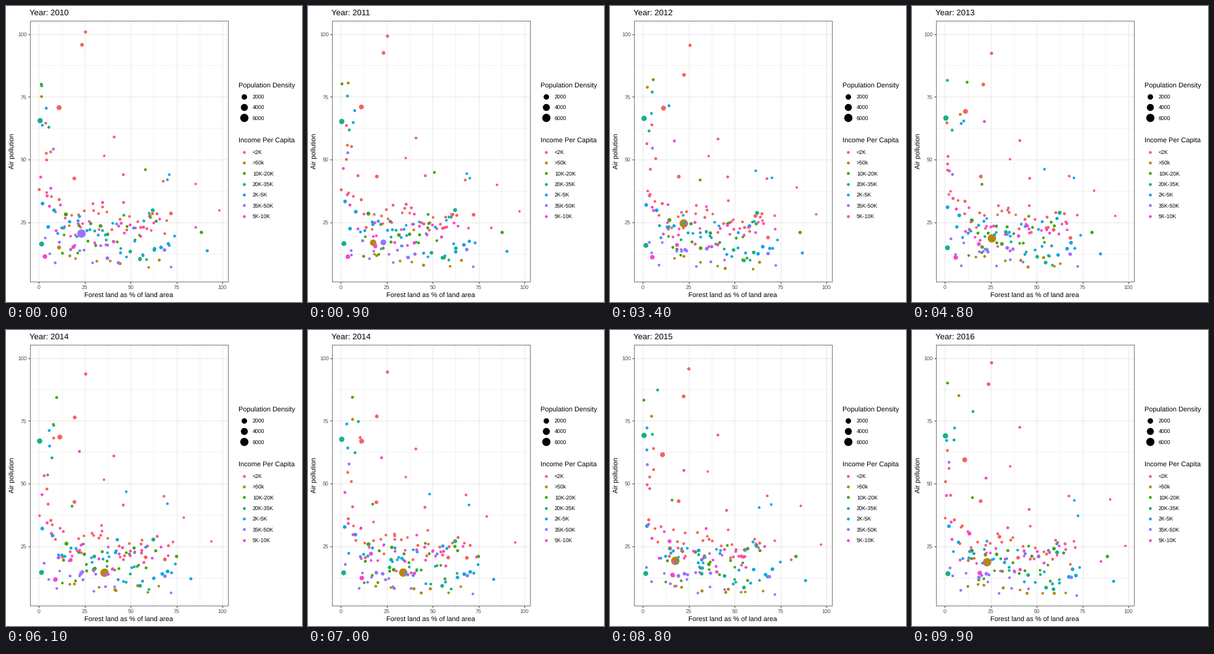
Animation of 480x480 px, one loop 10 s. Source, as a matplotlib script:

```python
import numpy as np
import matplotlib.pyplot as plt
from matplotlib.animation import FuncAnimation
from matplotlib.ticker import FixedLocator

SIZE, FRAMES, YEARS = 480, 100, 7
plt.rcParams.update({"font.family": "Liberation Sans", "text.hinting": "none"})

rng = np.random.default_rng(12)
later = np.arange(YEARS) > 0
layers = []


def spread(keys):
    """Stretch one or more evenly spaced key values over all years."""
    keys = np.atleast_1d(keys)
    return np.interp(np.linspace(0, 1, YEARS), np.linspace(0, 1, len(keys)), keys)


def anchor(x, y, d):
    """A dot that keeps near its place, or follows its keys exactly."""
    keyed = np.ndim(x) > 0
    shake = 0 if keyed else later * rng.normal(0, 1, YEARS)
    return [spread(x) + 0.3 * shake, spread(y) + 0.8 * shake, spread(d)]


def tail(n, low, high):
    """Polluted places with little forest, which jump from year to year."""
    x = np.minimum(rng.exponential(4, (n, YEARS)), 22)
    y = rng.uniform(low, high, (n, 1)) + later * rng.normal(0, 5, (n, YEARS))
    return np.stack([x, y, np.full(x.shape, 4.7)], axis=1)


def cloud(n, left, right, mid, sd, lift):
    """Small dots around random homes; each year some of them trade places."""
    x = left + (right - left) * (np.arange(n) + rng.random(n)) / n
    y = mid + lift * np.exp(-x / 10) + sd * np.clip(rng.normal(size=n), -1.7, 2.2)
    d = 4.2 + np.minimum(rng.exponential(0.5, n), 1.8)
    years = []
    for k in range(YEARS):
        if k:
            pick = np.flatnonzero(rng.random(n) < 0.25)
            x[pick], y[pick] = np.roll(x[pick], 1), np.roll(y[pick], 1)
        px, py = rng.normal(0, 1, (2, n)) * later[k]
        years.append((np.maximum(x + px, 0.2), np.maximum(y + py - 0.3 * k, 6.3), d))
    return np.array(years).transpose(2, 1, 0)


def series(label, color, anchors, tails, rule):
    lead = [anchor(*a) for a in anchors]
    layers.append((label, color, np.concatenate([lead, tail(*tails), cloud(*rule)])))


# Anchors: x, y, diameter. Tails: count, y range.
# Clouds: count, x range, mean y, its deviation, extra height at the left.
series("<2K", "#F8625C", [
    (11, (70.7, 70, 67, 60), 8),
    (25.4, (100.8, 92, 98), 5.3),
    ((23.5, 22.5, 19, 23.8), (95.7, 84, 75, 89.6), 6),
    (19.3, 42.5, 6),
    (41, (59, 58, 73), 4.6),
    (35.6, (51.5, 50.5, 57), 4),
    (67.7, (41.4, 45.5), 4.4),
    (46, (44, 40), 4.7),
], (4, 48, 72), (30, 0, 74, 27, 4.5, 13))

gold_x, gold_y = (11, 23, 22, 26, 40, 15, 23), (15, 18.5, 25, 18, 13, 19.5, 18.7)
series(">50k", "#B5880C", [(gold_x, gold_y, [6.4] + [13.6] * 6)],
       (1, 75, 85), (8, 10, 72, 10.5, 2, 0))

series("10K-20K", "#3FA60A", [
    ((88.5, 86, 73, 88.5), 21, 5.4),
    (14.7, (28.2, 23.5), 6.4),
    ((58, 19, 15), (46, 40, 44.4), 4.5),
], (1, 45, 82), (19, 10, 65, 19, 4.5, 0))

series("20K-35K", "#14B284", [
    (0.7, (65.5, 67, 70), 8.6),
    (1.5, (16.4, 13.7), 8),
    (62, (29.8, 25), 6.4),
    (55, (10.3, 8.3), 6),
], (2, 58, 85), (7, 18, 66, 17, 4, 0))

series("2K-5K", "#10A6E8", [
    ((91.7, 87, 82, 91.9), (13.7, 11.1), 5),
    (2, 32.5, 6),
    ((71, 62, 45, 72.5), (44, 45.5, 47, 37.2), 4.3),
    (70, 42, 4.3),
], (2, 52, 76), (27, 3, 76, 20.5, 5.5, 13))

fade = [13.6] + [6] * 6
series("35K-50K", "#9574FF", [
    ((23.2, 22.6), 9 + 0.85 * np.array(fade), fade),
    (68.4, (14, 11.5), 5.8),
    (72, (7.2, 6), 4.2),
], (1, 40, 62), (13, 1, 44, 14, 3, 0))

series("5K-10K", "#FB45CF", [
    ((3.3, 6, 19), (11.4, 11, 14.4), 7.4),
    ((18.8, 18.5, 13.4), (15.2, 16.4, 30.1), 6.4),
    ((85.4, 84, 78, 90), (40.3, 39, 36, 43.7), 4),
    ((98.3, 92.6, 98.3), (29.8, 25.2), 3.9),
    ((6.5, 22, 22.4), (38.6, 66, 52.2), 4.8),
    ((85.4, 66, 85), (23, 22, 19), 4.3),
], (1, 40, 64), (25, 2, 67, 23.5, 4.5, 8))

points = np.concatenate([pts for *_, pts in layers]).transpose(2, 1, 0)
colors = [c for _, c, pts in layers for _ in pts]

# dpi 72 makes one point equal one pixel
fig = plt.figure(figsize=(SIZE / 72, SIZE / 72), dpi=72, facecolor="white")
L, R, T, B = 38.5, 360.3, 23.5, 447.3
X0, DX, Y0, DY = 53.3, 2.978, 452.7, 4.072
ax = fig.add_axes([L / SIZE, 1 - B / SIZE, (R - L) / SIZE, (B - T) / SIZE])
ax.set(xlim=((L - X0) / DX, (R - X0) / DX), ylim=((Y0 - B) / DY, (Y0 - T) / DY))
ax.set_axisbelow(True)
for axis, first in ((ax.xaxis, 0), (ax.yaxis, 25)):
    axis.set_major_locator(FixedLocator(range(first, 101, 25)))
    axis.set_minor_locator(FixedLocator(np.arange(12.5, 100, 25)))
ax.grid(which="major", color="#E8E8E8", lw=1.07)
ax.grid(which="minor", color="#E8E8E8", lw=0.53)
ax.tick_params(which="major", length=2.75, width=1.07, pad=2.2, color="#333333",
               labelsize=8.8, labelcolor="#4D4D4D")
ax.tick_params(which="minor", length=0)
for side in ax.spines.values():
    side.set(color="#757575", linewidth=1)

page = fig.add_axes([0, 0, 1, 1])
page.set(xlim=(0, SIZE), ylim=(SIZE, 0))
page.axis("off")


def write(x, y, text, size, **kw):
    return page.text(x, y, text, fontsize=size, color="black", **kw)


def key(y, label, color, d):
    page.scatter([386.3], [y], s=d * d, c=color, lw=0)
    write(400, y + 3.2, label, 8.8)


title = write(38.4, 14.8, "", 13.2)
write(199.2, 472.6, "Forest land as % of land area", 11, ha="center")
write(10.6, 235.5, "Air pollution", 11, rotation=90, ha="center", va="center")
write(377, 132.6, "Population Density", 11)
for k in range(3):
    people = 2000 * (k + 1)
    key(146.7 + 17.28 * k, str(people), "black", 2.8 + 10.5 * np.sqrt(people / 6000))
write(377, 221.6, "Income Per Capita", 11)
for k, (label, color, _) in enumerate(layers):
    key(236.9 + 17.28 * k, label, color, 4.7)

dots = ax.scatter(points[0, 0], points[0, 1], s=points[0, 2] ** 2, c=colors, lw=0)


def draw(i):
    year = i * (YEARS - 1) / (FRAMES - 1)
    k = min(int(year), YEARS - 2)
    x, y, d = points[k] + (points[k + 1] - points[k]) * (year - k)
    dots.set_offsets(np.column_stack([x, y]))
    dots.set_sizes(d ** 2)
    title.set_text(f"Year: {2010 + round(year)}")
    return dots, title


anim = FuncAnimation(fig, draw, frames=FRAMES, interval=100, repeat=True,
                     repeat_delay=0, init_func=lambda: draw(0))
plt.show()
```
